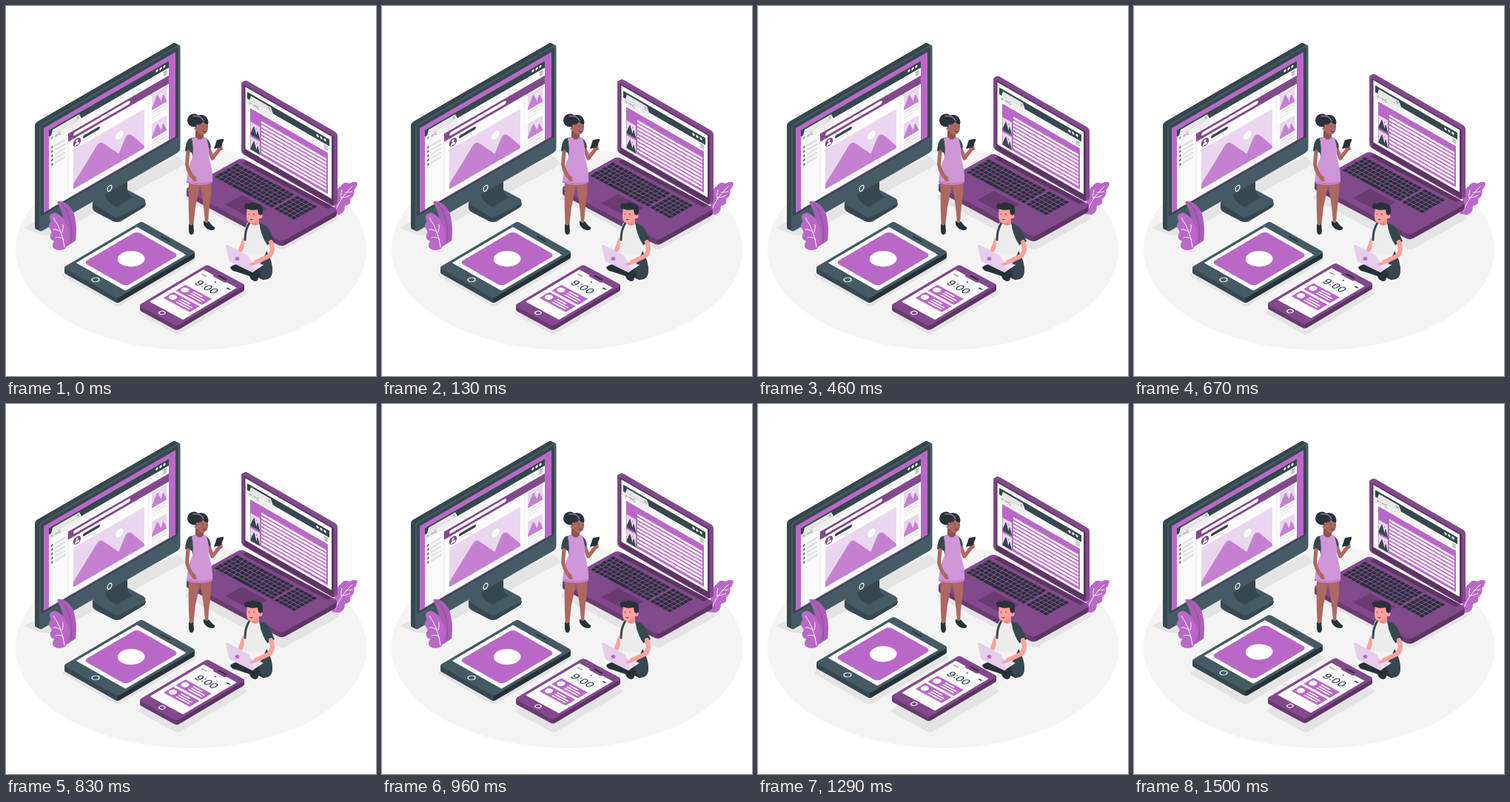
An HTML page for the animation above (1540 ms loop, 500 by 500 pixels).

```html
<!DOCTYPE html>
<html lang="en">
<head>
<meta charset="utf-8">
<title>Devices</title>
<style>
html, body { margin: 0; width: 100%; height: 100%; overflow: hidden; background: #fff; }
svg { display: block; width: 100%; height: 100%; }
</style>
</head>
<body>
<svg id="stage" viewBox="0 0 500 500"></svg>
<script>
const C = {
  lilac: '#ba68c8', plum: '#82498c', plumMid: '#693b71', plumDark: '#5d3464',
  slate: '#455a64', slateMid: '#37474f', ink: '#263238',
  floor: '#f4f4f4', shade: '#e4e4e4', pale: '#ebd6ef', line: '#e0e0e0',
  brown: '#ad6860', pink: '#f9a19d', dress: '#cf95d9'
};

// Drawing helpers
const shape = (d, fill) => `<path d="${d}" fill="${fill}"/>`;
const line = (d, color, w = 1) =>
  `<path d="${d}" fill="none" stroke="${color}" stroke-width="${w}" stroke-linecap="round" stroke-linejoin="round"/>`;
const rect = (x, y, w, h, fill, r = 0) =>
  `<rect x="${x}" y="${y}" width="${w}" height="${h}" rx="${r}" fill="${fill}"/>`;
const dot = (x, y, r, fill) => `<circle cx="${x}" cy="${y}" r="${r}" fill="${fill}"/>`;
const ring = (x, y, r, w) =>
  `<circle cx="${x}" cy="${y}" r="${r}" fill="none" stroke="#fff" stroke-width="${w}"/>`;
const group = (transform, body, id = '') => `<g id="${id}" transform="${transform}">${body}</g>`;
const repeat = (n, fn) => Array.from({ length: n }, (_, i) => fn(i)).join('');

// Flat devices lying on the floor
const slabs = {
  laptop: { m: 'matrix(.866 .463 -.866 .485 318 205)', w: 152, h: 89, r: 6, depth: 7,
            top: C.plum, left: C.plumMid, right: C.plumDark },
  tablet: { m: 'matrix(.866 .49 -.866 .51 183 291)', w: 85, h: 122, r: 3.5, depth: 7,
            top: C.slate, left: C.slateMid, right: C.ink },
  phone:  { m: 'matrix(.866 .47 -.866 .515 272 349.3)', w: 60, h: 107.4, r: 4, depth: 6,
            top: C.plum, left: C.plumMid, right: C.plumDark }
};

function slab(name, face) {
  const { m, w, h, r, depth, top, left, right } = slabs[name];
  const k = (w + h) / 2, edge = w / (w + h);
  return `<linearGradient id="${name}Side" gradientUnits="userSpaceOnUse" x1="0" y1="${h}" x2="${k}" y2="${h - k}">
    <stop offset="${edge}" stop-color="${left}"/><stop offset="${edge}" stop-color="${right}"/></linearGradient>` +
    repeat(depth, i => group(`translate(0 ${depth - i}) ${m}`, rect(0, 0, w, h, `url(#${name}Side)`, r))) +
    group(m, rect(0, 0, w, h, top, r) + face);
}

function shadow(name, dx, dy) {
  const { m, w, h, r } = slabs[name];
  return group(`translate(${dx} ${dy}) ${m}`, rect(-1, -1, w + 3, h + 3, C.shade, r));
}

function floor() {
  return `<ellipse cx="250" cy="329" rx="237" ry="136" fill="${C.floor}"/>` +
    shape('M24 300L42 290L232 203L242 214L190 242L62 310L46 309Z', C.shade) +
    shadow('laptop', 1, 10) + shadow('tablet', 0, 10) + shadow('phone', 1, 10);
}

// Browser chrome shared by both upright screens
function chrome(x, y, w, tab) {
  return rect(x, y, w, 9.5, C.slateMid) +
    rect(x, y + 9.5, w, 10, '#fafafa') +
    shape(`M${x + 3} ${y + 9.5}L${x + 5} ${y + 2.5}H${x + tab - 3}L${x + tab} ${y + 9.5}Z`, '#e6e6e6') +
    line(`M${x + tab - 6} ${y + 4.5}l2.4 3m0 -3l-2.4 3`, '#8a8a8a', .6) +
    rect(x, y + 9.5, tab, 7, '#eee') +
    line(`M${x + 6} ${y + 13}h-3l1.3 -1.3m-1.3 1.3l1.3 1.3M${x + 8} ${y + 13}h3l-1.3 -1.3m1.3 1.3l-1.3 1.3`, '#8a8a8a', .6) +
    line(`M${x + 15.5} ${y + 11.7}a1.8 1.8 0 1 0 .3 2.2`, '#8a8a8a', .7) +
    repeat(3, i => dot(x + w - 16 + i * 5, y + 4.3, 1.7, '#fff')) +
    repeat(3, i => line(`M${x + w - 7} ${y + 11.7 + i * 2}h4.5`, '#777', .8));
}

// Two peaks and a sun, in a w by h box
function landscape(x, y, w, h, back, hill, sun) {
  const at = (u, v) => `${x + w * u} ${y + h * v}`;
  return rect(x, y, w, h, back) +
    shape(`M${at(0, 1)}L${at(0, .87)}L${at(.33, .24)}Q${at(.375, .16)} ${at(.42, .27)}L${at(.64, .77)}` +
      `L${at(.73, .46)}Q${at(.77, .37)} ${at(.82, .48)}L${at(1, .94)}L${at(1, 1)}Z`, hill) +
    dot(x + w * .65, y + h * .3, w * .056, sun);
}

function monitor() {
  const stand =
    shape('M117 265V274Q118 277 122 279L145 291Q150 293 155 291L185 273Q189 271 189 266Z', C.slateMid) +
    shape('M119 268Q115 264 121 260L148 245Q153 243 158 245L186 260Q191 264 186 268L155 284Q150 287 145 284Z', C.slate) +
    shape('M132 246L164 228V248Q164 255 172 259L150 271Q133 266 132 246Z', C.slateMid);
  const plane = 'matrix(1 -.577 0 1 0 25.97)';
  const frame = repeat(6, i => group(`translate(${i - 6} ${(i - 6) / 2})`,
    group(plane, rect(45, 161, 190.5, 145, C.slateMid, 4))));
  const side = repeat(5, i =>
    rect(61, 199.5 + i * 5.8, 2.6, 2.6, C.plum, 1) + rect(66, 199.5 + i * 5.8, 14, 2.8, C.line));
  const column = line('M193 206V279', C.line, .8) +
    [208, 247].map(y => landscape(197, y, 20, 20.5, C.pale, '#c580d1', '#fff') +
      repeat(3, i => rect(197, y + 23.5 + i * 3.6, [20, 20, 14][i], 1.4, C.line))).join('');
  const face = rect(45, 161, 190.5, 145, C.slate, 4) +
    rect(47, 163.5, 185.5, 122, C.slateMid, 2) +
    rect(51, 168.5, 178, 114.5, C.lilac) +
    rect(58, 175, 162, 107, '#fff') +
    chrome(58, 175, 162, 44) +
    rect(58, 195, 26, 87, '#fafafa') + line('M84 195V282', C.line, .8) + side +
    rect(84, 195, 136, 11, C.plum) + rect(91, 198, 77, 4.6, '#fff', 2.3) +
    dot(96, 213.5, 5.2, C.plum) + dot(96, 211.8, 1.7, '#fff') +
    shape('M92.8 217Q93 213.8 96 213.8T99.2 217Z', '#fff') +
    rect(104, 209.5, 23, 4, C.slateMid, 2) + rect(104, 215.5, 14, 1.6, C.line) +
    landscape(91, 221, 96, 53, C.pale, '#c580d1', '#fff') + column +
    `<ellipse cx="140" cy="301" rx="3" ry="3.6" fill="none" stroke="#fff" stroke-width="1.2"/>`;
  return stand + frame + group(plane, face);
}

function plants() {
  return shape('M69 264Q82 262 91 278Q97 298 94 317L79 327Q86 299 69 264Z', '#a95fb6') +
    line('M76 267Q92 289 88 319', C.plum, .8) +
    shape('M60 282Q66 276 74 284Q80 287 79 294Q86 296 84 306Q88 312 83 319L80 328Q72 332 65 328Q61 324 65 318Q58 315 60 309Q63 306 60 302Q55 297 61 291Q57 286 60 282Z', C.lilac) +
    line('M64 286Q76 303 79 326M75 306Q69 301 64 302M78 315Q72 311 67 313M76 305Q78 300 77 295', '#fff', .9) +
    shape('M440 281Q445 272 444 262Q446 246 452 244Q457 236 464 240Q470 236 475 239Q474 246 470 249Q472 256 465 261Q467 269 458 270Q458 280 450 282Z', C.lilac) +
    line('M445 277Q452 258 468 244M453 260Q452 254 454 249M453 259Q460 259 465 256M459 252Q464 251 468 251', '#fff', .9);
}

function laptop() {
  const cols = 19, pitch = 6.5;
  const keys = repeat(6, r => repeat(cols, c => {
    const x = 5 + c * pitch + (c > 13 ? 3 : r % 2);
    const space = r === 5 && c > 3 && c < 8;
    return rect(x, 12 + r * 6.2, space ? pitch : 5.3, 4.9, C.ink, .8);
  }));
  const base = slab('laptop',
    rect(8, 0, 134, 7, C.plumDark, 2) + keys + rect(54, 53, 40, 26, C.plumMid, 1));
  const thumbs = [149, 169].map(y => landscape(330.5, y, 12.5, 17.5, C.pale, C.slateMid, C.plum)).join('');
  const screen = rect(323.5, 106, 116.5, 84, '#fff') +
    chrome(326, 111.5, 111, 35) +
    rect(330, 131, 105, 55.5, C.lilac) +
    repeat(9, i => rect(345, 140 + i * 5, 88, 3, '#fff')) + thumbs;
  const plane = 'matrix(1 .577 0 1 0 -183.5)';
  const lid = repeat(4, i => group(`translate(${4 - i} ${i / 2 - 2})`,
      group(plane, rect(318, 101, 126, 98, C.plum, 4)))) +
    group(plane, rect(318, 101, 126, 98, C.plum, 4) +
      rect(321.5, 104, 121.5, 94, C.plumDark, 2) + screen);
  return base + lid;
}

function tablet() {
  return slab('tablet',
    rect(4, 11, 77, 95, '#fff', 1) +
    rect(9.5, 17, 66, 83, C.lilac, 6) +
    dot(42.5, 58.5, 15, '#fff') +
    line('M36 5.5H49', C.ink, 1.8) + ring(42.5, 114, 4, 1.3));
}

function phone() {
  const card = (y, icon) => rect(10, y, 41, 15.5, C.lilac, 1) + icon +
    [14, 21, 21].map((w, i) => rect(26, y + 3 + i * 3.8, w, 1.8, '#fff')).join('');
  return slab('phone',
    rect(4, 10, 52, 84, '#fff', 1) +
    rect(20, 7, 20, 5, C.plum, 2) + line('M25 7H36', C.ink, 2.2) +
    rect(8, 16.5, 8, 1.3, '#888') + dot(30.5, 18, 1.1, C.slateMid) + rect(48, 16.7, 5, 2, C.slateMid, .5) +
    `<text x="30.5" y="36.5" text-anchor="middle" font-family="Inter, sans-serif" font-weight="500" font-size="14" fill="${C.slateMid}">9:00</text>` +
    card(44, dot(17, 51.7, 4.6, '#fff')) + card(63, dot(17, 70.7, 4.6, '#fff')) +
    ring(29.5, 100, 3.3, 1.2));
}

function woman() {
  const legs =
    shape('M247 238L263 239Q259 258 256 272L253 299L248 299Q246 272 247 238Z', C.brown) +
    shape('M262 239L277 239Q278 254 275 270L273 292L269 293Q268 278 266 264Z', C.brown) +
    shape('M247 294Q250 299 253 294L254 304Q254 309 250 309Q247 308 247 302Z', C.ink) +
    shape('M267 290Q271 295 274 291Q278 297 282 299Q283 303 278 303Q270 302 267 295Z', C.ink);
  const body =
    line('M273 190L279 206L288 194', C.brown, 5) +
    shape('M285 190L292 187L293 194L287 197Z', C.brown) +
    shape('M285 181L293 179.5Q295 180 294 182L290 191L281 193Z', C.ink) +
    shape('M256 177L248 179Q243 182 242 196L251 198L253 206H274L273 194L277 191Q276 180 267 177Z', C.slateMid) +
    shape('M251 179L256 177Q262 181 267 177L271 179Q276 193 274 205Q280 222 279 239Q262 244 244 239Q245 219 252 205Q254 192 251 179Z', C.dress) +
    line('M244.5 237.5Q262 242 278.5 237.5', C.lilac, 1.2) +
    shape('M256 168H267V177Q262 184 256 177Z', '#8f534c') +
    line('M246 197L244.5 214Q247 226 254 233', C.brown, 5) +
    shape('M248 226L256 230L258 237L253 237Z', C.brown);
  const head =
    dot(254, 154.5, 9, C.ink) + dot(263.5, 157, 10, C.ink) +
    shape('M257 160Q265 161 266 156Q269 160 273 160V166Q272 174 264 174Q257 172 257 160Z', C.brown) +
    dot(256.5, 166, 2, C.brown) +
    line('M253 149Q263 147 267 155', C.lilac, 1.4) +
    line('M266 163h.6M271 163h.4M266 169.5q2 1 3.5 0', C.ink, .9);
  return legs + body + head;
}

function man() {
  const legs =
    shape('M303 353Q310 347 320 349L340 354Q350 338 352 331Q360 343 360 359Q359 371 347 370L341 367Q341 372 336 372Q330 370 329 365L311 359Q304 358 303 353Z', C.ink) +
    shape('M340 352Q349 345 352 333Q360 344 360 359Q358 370 346 369Z', C.slateMid);
  const torso =
    line('M322 316L317 330', C.pink, 6) +
    shape('M326 293Q333 290 344 294L353 301L351 333Q339 338 322 332L321 306Z', '#ececec') +
    line('M329 293Q323 302 323 316', C.slateMid, 3) +
    shape('M342 293Q353 296 357 304L363 318L353 323Q347 314 344 303Z', C.slateMid) +
    line('M358 319Q363 332 355 338L336 347', C.pink, 6) +
    shape('M332 286H342V294Q337 300 331 294Z', '#ee8c88');
  const head =
    shape('M326 274Q323 290 329 293Q336 295 341 288L344 273Z', C.pink) + dot(343.5, 284, 3, C.pink) +
    shape('M322 271Q322 266 329 267Q334 264 340 267Q347 268 347 275Q348 280 344 283L341 281L340 275Q330 277 326 274Q322 275 322 271Z', C.ink) +
    line('M328.5 281v.8M335 281v.8M330 288.5q1.5 1 3 0', C.ink, .9);
  const notebook =
    shape('M303 345L333 360L348 350L331 343Z', '#f0e2f3') +
    shape('M297 324Q297 322 300 323L326 337Q329 339 330 342L335 358Q334 361 331 359L304 346Q302 345 301 342Z', '#e6cdea') +
    `<ellipse cx="312.5" cy="341.5" rx="2.8" ry="2.5" fill="${C.lilac}"/>` +
    line('M332 349L340 346', C.pink, 4);
  return legs + torso + head + notebook;
}

const stage = document.getElementById('stage');
stage.innerHTML = floor() + monitor() + plants() +
  group('', laptop(), 'laptop') + woman() +
  group('', tablet(), 'tablet') + group('', phone(), 'phone') + man();

// Each device floats up and down linearly, starting after its own delay
const delays = { laptop: 0, phone: 500, tablet: 1000 };
const parts = Object.entries(delays).map(([id, delay]) => [document.getElementById(id), delay]);
const LOOP = 1540, PERIOD = 1500, LIFT = 10, STEP = 1000 / 24;

function lift(t) {
  if (t <= 0) return 0;
  const p = (t % PERIOD) / PERIOD;
  return LIFT * (1 - Math.abs(1 - 2 * p));
}

const start = performance.now();
function draw(now) {
  const t = Math.max(0, now - start) % LOOP;
  const held = Math.floor((t + 5) / STEP) % 37 * STEP;
  for (const [el, delay] of parts) {
    el.setAttribute('transform', `translate(0 ${(-lift(held - delay)).toFixed(2)})`);
  }
  requestAnimationFrame(draw);
}
draw(start);
</script>
</body>
</html>
```
